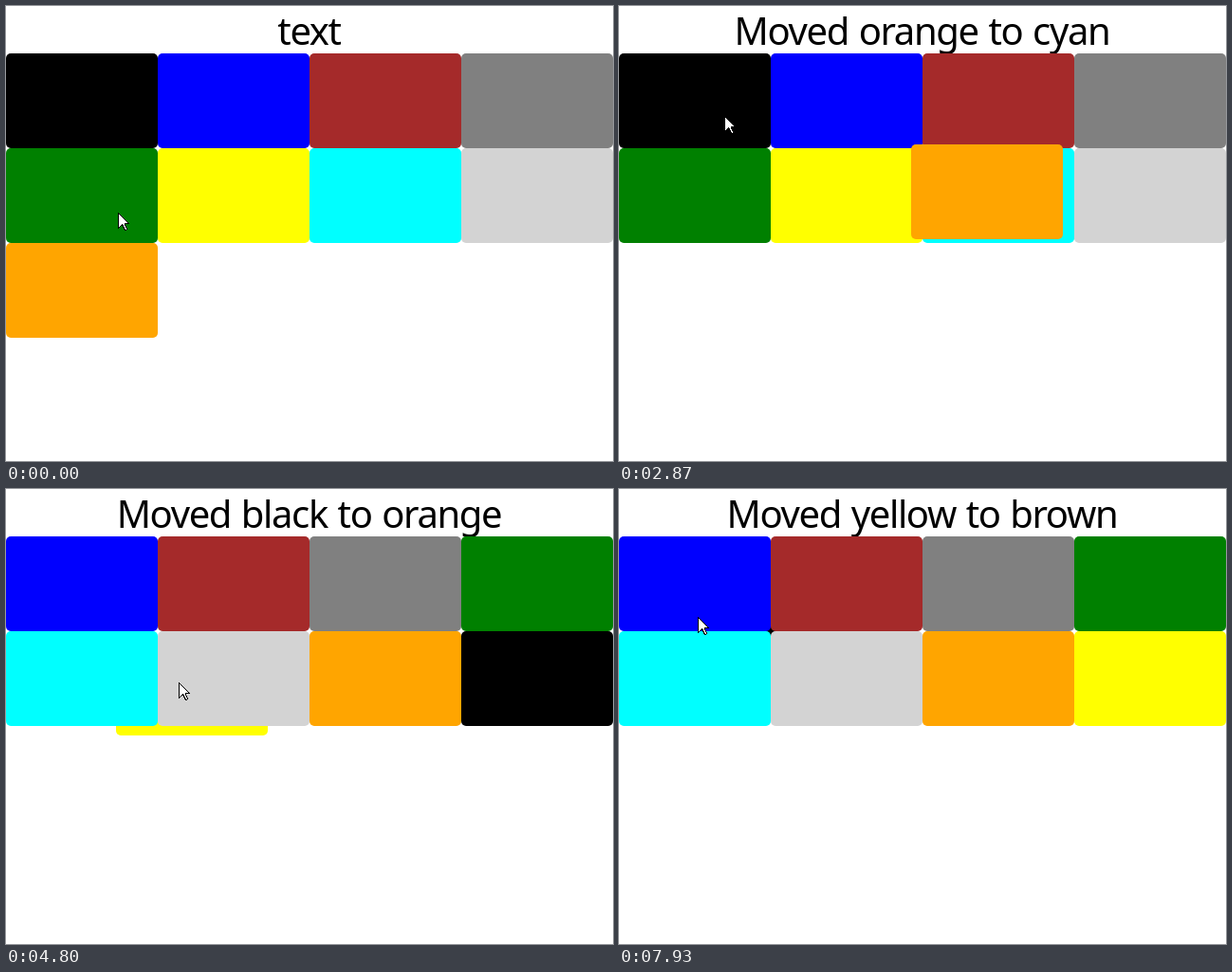
Write an HTML page that moves like this. It is 640 px wide and 480 px high and loops after 8000 ms.

```html
<!DOCTYPE html>
<html lang="en">
<head>
<meta charset="utf-8">
<title>Drag tiles</title>
<style>
  html, body { margin: 0; width: 100%; height: 100%; overflow: hidden; background: #fff; }
  svg { display: block; width: 640px; height: 480px; }
  text { font: 40px "Noto Sans", sans-serif; letter-spacing: -1.35px; word-spacing: 1.6px; text-anchor: middle; }
</style>
</head>
<body>
<svg viewBox="0 0 640 480">
  <text id="title" x="319.5" y="41">text</text>
  <g id="tiles"></g>
  <path id="cursor" fill="#fff" stroke="#000" shape-rendering="crispEdges"
    d="M.5 .5V16.5L4.5 12.5L7.5 18.5H8.5L9.5 17L7.5 12.5V11.5H11.5Z"/>
</svg>
<script>
const LOOP = 8000, TICK = 1000 / 15, LAST = 119;
const COLORS = ["black", "blue", "brown", "gray", "green", "yellow", "cyan", "lightgray", "orange"];
const HOME = [118, 218];

const smooth = u => u * u * (3 - 2 * u);
const easeOut = u => u * (2 - u);

// Pointer moves in ticks; sag bows the path downwards.
const MOVES = [
  { from: 0, until: 6, to: [89, 280] },
  { from: 8, until: 9, to: [103, 274] },
  { from: 9, until: 20, to: [411, 170] },
  { from: 23, until: 36, to: [183, 161], sag: 61 },
  { from: 36, until: 41, to: [101, 111] },
  { from: 42, until: 43, to: [111, 116] },
  { from: 43, until: 54, to: [563, 216] },
  { from: 56, until: 66, to: [66, 194], sag: 7, ease: easeOut },
  { from: 67, until: 79, to: [374, 140], sag: 33 },
  { from: 79, until: 90, to: [231, 80], sag: -6 },
  { from: 90, until: 94, to: [208, 132] },
  { from: 94, until: 106, to: [556, 180], sag: 50 },
  { from: 107, until: 119, to: [83, 135] }
];

// A grabbed tile leaves the grid and rejoins it last at the next grab.
const DRAGS = [
  { name: "orange", grab: 9, drop: 20, target: "cyan" },
  { name: "black", grab: 43, drop: 56, target: "orange" },
  { name: "yellow", grab: 67, drop: 90, target: "brown" },
  { name: "black", grab: 107, drop: LOOP }
];

const title = document.getElementById("title");
const cursor = document.getElementById("cursor");
const layer = document.getElementById("tiles");
const tiles = {};
for (const color of COLORS) {
  const tile = document.createElementNS(layer.namespaceURI, "rect");
  const attrs = { width: 160, height: 100, rx: 5, fill: color };
  for (const key in attrs) tile.setAttribute(key, attrs[key]);
  tiles[color] = layer.appendChild(tile);
}

function pointer(tick) {
  let start = HOME;
  for (const { from, until, to, sag = 0, ease = smooth } of MOVES) {
    if (tick <= from) break;
    if (tick < until) {
      const s = ease((tick - from) / (until - from));
      const [x, y] = start.map((value, axis) => value + (to[axis] - value) * s);
      return [Math.round(x), Math.round(y + sag * Math.sin(Math.PI * s))];
    }
    start = to;
  }
  return start;
}

const cell = i => [i % 4 * 160, 50 + Math.floor(i / 4) * 100];

function place(node, [x, y]) {
  node.setAttribute("transform", `translate(${x} ${y})`);
}

function draw(tick) {
  let order = COLORS, held = null, origin, label = "text";
  for (const drag of DRAGS) {
    if (tick <= drag.grab) break;
    held = drag;
    origin = cell(order.indexOf(drag.name));
    order = order.filter(color => color !== drag.name).concat(drag.name);
    if (tick >= drag.drop) label = `Moved ${drag.name} to ${drag.target}`;
  }
  order.forEach((color, i) => place(tiles[color], cell(i)));
  if (held) {
    const grip = pointer(held.grab), now = pointer(Math.min(tick, held.drop));
    place(tiles[held.name], origin.map((value, axis) => value + now[axis] - grip[axis]));
  }
  if (title.textContent !== label) title.textContent = label;
  place(cursor, pointer(tick));
}

const start = performance.now();
function frame() {
  const time = (performance.now() - start) % LOOP;
  draw(Math.min(LAST, Math.floor((time + 4) / TICK)));
  requestAnimationFrame(frame);
}
frame();
</script>
</body>
</html>
```
